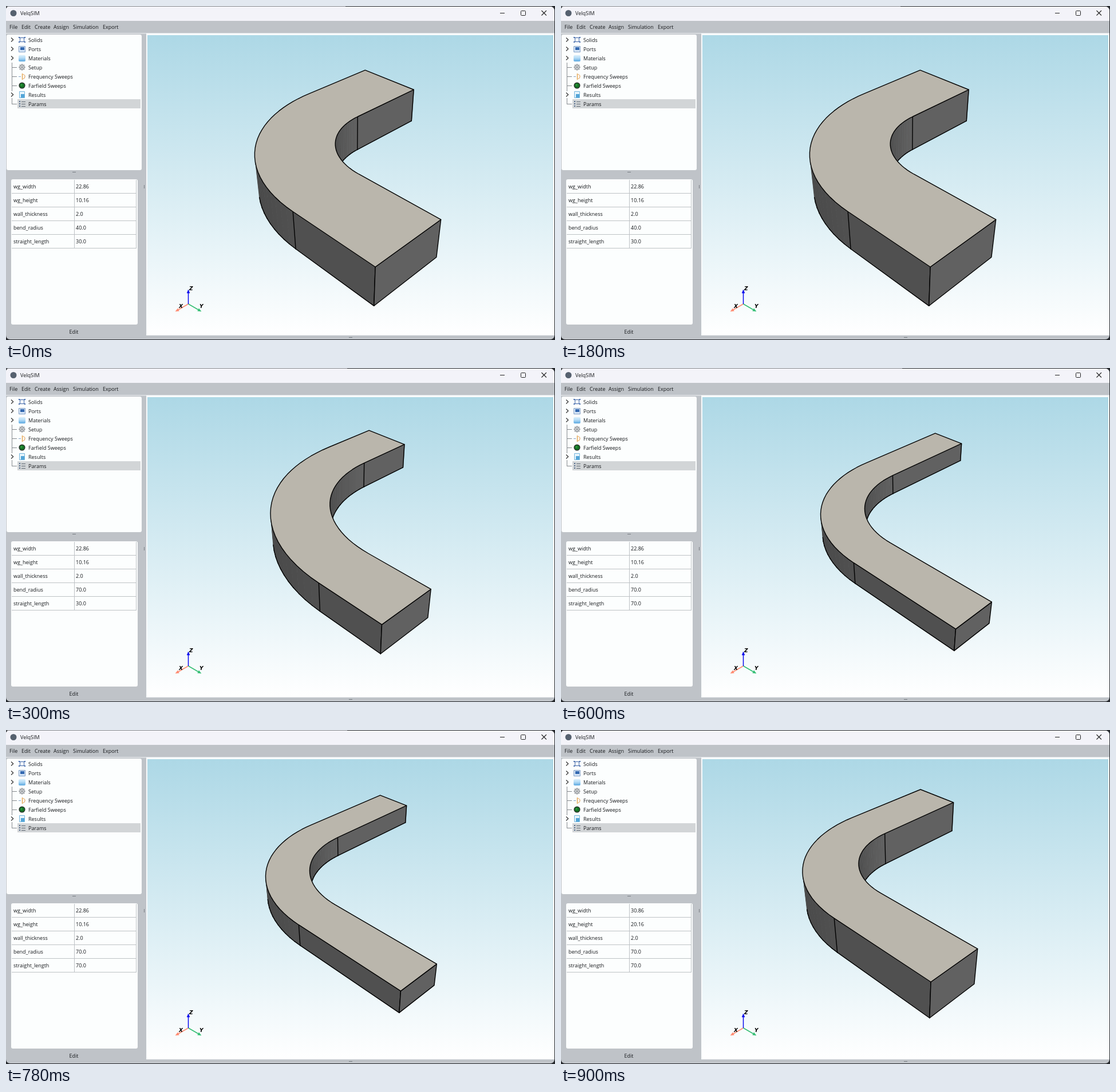
An HTML page with a canvas that plays this animation: 959 by 584 pixels, repeating every 1.2 s.

```html
<!DOCTYPE html>
<html lang="en">
<head>
<meta charset="utf-8">
<title>VelqSIM</title>
<style>
  html, body { margin: 0; width: 100%; height: 100%; overflow: hidden; background: #23262a; }
  canvas, svg { position: absolute; left: 0; top: 0; width: 959px; height: 584px; display: block; }
  text { font: 9px "Open Sans", "Noto Sans", sans-serif; fill: #17191c; white-space: pre; }
  .axis { font: italic bold 9px "DejaVu Sans", sans-serif; fill: #000; }
</style>
</head>
<body>
<canvas id="stage" width="959" height="584"></canvas>
<svg id="labels" viewBox="0 0 959 584"></svg>
<script>
const ctx = document.getElementById('stage').getContext('2d');
const labels = document.getElementById('labels');
const STEP = 300, WALL = 2, SEGS = 28;
const FOCAL = 980, CX = 602, CY = 313;

// Guide parameters, plus camera scale and the bend centre in camera units
const states = [
  { width: 22.86, height: 10.16, radius: 40, length: 30, scale: 170.3, ox: -.7685, oy: -.5911, strip: 593 },
  { width: 22.86, height: 10.16, radius: 70, length: 30, scale: 229.5, ox: -.832, oy: -.5421, strip: 596 },
  { width: 22.86, height: 10.16, radius: 70, length: 70, scale: 312.6, ox: -.7481, oy: -.6069, strip: 596 },
  { width: 30.86, height: 20.16, radius: 70, length: 70, scale: 313.5, ox: -.7485, oy: -.6456, strip: 0 }
];

function rect(x, y, w, h, fill, r = 0) {
  ctx.fillStyle = fill;
  ctx.beginPath();
  ctx.roundRect(x, y, w, h, r);
  ctx.fill();
}

function line(color, width, ...pts) {
  ctx.strokeStyle = color;
  ctx.lineWidth = width;
  ctx.beginPath();
  for (let i = 0; i < pts.length; i += 2) ctx.lineTo(pts[i], pts[i + 1]);
  ctx.stroke();
}

function poly(pts, fill, edge, width = 1.4) {
  ctx.beginPath();
  pts.forEach(p => ctx.lineTo(p[0], p[1]));
  ctx.closePath();
  ctx.fillStyle = fill;
  ctx.fill();
  ctx.strokeStyle = edge;
  ctx.lineWidth = width;
  ctx.stroke();
}

function disc(x, y, r, fill) {
  ctx.fillStyle = fill;
  ctx.beginPath();
  ctx.arc(x, y, r, 0, 7);
  ctx.fill();
}

function label(x, y, str, cls) {
  const t = document.createElementNS('http://www.w3.org/2000/svg', 'text');
  t.setAttribute('x', x);
  t.setAttribute('y', y);
  if (cls) t.setAttribute('class', cls);
  t.textContent = str;
  labels.append(t);
  return t;
}

// Isometric view with perspective; z is measured from the top face
function project(s, [x, y], z) {
  const X = s.ox + x / s.scale, Y = s.oy + y / s.scale, Z = z / s.scale;
  const depth = 1 / 3 - (X + Y + Z) / Math.sqrt(3);
  const across = (Y - X) / Math.SQRT2;
  const up = -Math.SQRT2 / 3 + (2 * Z - X - Y) / Math.sqrt(6);
  return [CX + FOCAL * across / depth, CY - FOCAL * up / depth];
}

function rail(r, len) {
  const pts = [[-len, -r]];
  for (let i = 0; i <= SEGS; i++) {
    const a = (i / SEGS - 1) * Math.PI / 2;
    pts.push([r * Math.cos(a), r * Math.sin(a)]);
  }
  pts.push([r, len]);
  return pts;
}

const gray = v => `rgb(${v},${v},${v})`;

function wall(top, low, side, shade) {
  const front = top.map((p, i) => {
    const q = top[i + 1], b = low[i];
    return !!q && side * ((q[0] - p[0]) * (b[1] - p[1]) - (q[1] - p[1]) * (b[0] - p[0])) > 0;
  });
  front.forEach((on, i) => {
    if (!on) return;
    const t = Math.min(1, Math.max(0, (i - .5) / SEGS));
    const color = gray(Math.round(shade(t)));
    poly([top[i], top[i + 1], low[i + 1], low[i]], color, color, .8);
  });
  front.forEach((on, i) => { if (on) line('#000', 1.4, ...low[i], ...low[i + 1]); });
  for (const i of [0, 1, SEGS + 1, SEGS + 2])
    if (front[i] || front[i - 1]) line('#000', 1.4, ...top[i], ...low[i]);
}

function drawGuide(s) {
  const half = s.width / 2 + WALL, len = s.length + WALL, drop = -(s.height + 2 * WALL);
  const outer = rail(s.radius + half, len), inner = rail(s.radius - half, len);
  const at = (pts, z) => pts.map(p => project(s, p, z));
  const ot = at(outer, 0), ob = at(outer, drop), it = at(inner, 0), ib = at(inner, drop);
  const end = SEGS + 2;
  ctx.lineJoin = ctx.lineCap = 'round';
  wall(it, ib, -1, t => 97 - 42 * t);
  wall(ot, ob, 1, t => 80 - 22 * (1 - t));
  poly([ot[end], it[end], ib[end], ob[end]], gray(97), '#000');
  poly([...ot, ...it.reverse()], '#bab6ac', '#000');
  ctx.lineCap = 'butt';
  ctx.lineJoin = 'miter';
}

function drawTree() {
  rect(1, 50, 236, 237, '#fcfefe', 3);
  rect(20, 163, 215, 16, '#d2d5d7');
  line('#868a8e', 1, 10.5, 99, 10.5, 149);
  line('#868a8e', 1, 10.5, 161, 10.5, 171);
  for (const y of [107.5, 123.5, 139.5, 171.5]) line('#868a8e', 1, 10, y, 19, y);
  for (const y of [59, 75, 91, 155]) line('#333', 1.2, 9, y - 3.5, 12.7, y, 9, y + 3.5);

  ctx.strokeStyle = '#3f66a8';
  ctx.lineWidth = 1;
  ctx.strokeRect(24.5, 55.5, 7, 7);
  for (const x of [22, 32]) for (const y of [54, 62]) rect(x, y, 2, 2, '#3f66a8');

  rect(22, 70, 12, 11, '#7e9cc4', 1);
  rect(23, 71, 10, 9, '#d9e8f8');
  rect(25, 72, 7, 5, '#3569b1');

  const glass = ctx.createLinearGradient(0, 86, 0, 97);
  glass.addColorStop(0, '#d9effc');
  glass.addColorStop(.45, '#b4dcf6');
  glass.addColorStop(1, '#5ba8e0');
  rect(22, 86, 12, 11, glass, 2);

  for (let i = 0; i < 8; i++) {
    const a = i * Math.PI / 4;
    disc(28 + 4.5 * Math.cos(a), 107 + 4.5 * Math.sin(a), 1.2, '#8d9195');
  }
  disc(28, 107, 4.6, '#a7abaf');
  disc(28, 107, 2.7, '#d7dadc');
  disc(28, 107, 1.2, '#777c81');

  line('#e4a044', 1.3, 28.5, 118, 28.5, 129);
  line('#87a4c9', 1, 22, 123.5, 26, 123.5);
  ctx.strokeStyle = '#df913d';
  ctx.beginPath();
  ctx.arc(29, 123.5, 4, -1.4, 1.4);
  ctx.stroke();

  disc(28, 139, 5.6, '#28352b');
  disc(28, 139, 4, '#157526');
  disc(27, 138, 1.6, '#329d40');

  rect(23, 149, 10, 12, '#72b4dc', 1);
  rect(24, 150, 8, 10, '#e8f5fc');
  rect(26, 154, 6, 6, '#53a5d8');

  for (const y of [167, 171, 175]) {
    rect(23, y - 1, 2, 2, '#4c6586');
    line('#5d6670', 1, 27, y + .5, 34, y + .5);
  }
}

function drawPanel() {
  rect(9, 303, 221, 254, '#fcfefe', 3);
  for (let i = 0; i < 5; i++) line('#bec2c5', 1, 10, 327.5 + 24 * i, 228, 327.5 + 24 * i);
  for (const x of [119.5, 227.5]) line('#bec2c5', 1, x, 304, x, 423);
  line('#777c82', 1, 116, 290.5, 122, 290.5);
  line('#777c82', 1, 241.5, 313, 241.5, 319);
  line('#777c82', 1, 599, 579.5, 605, 579.5);
}

function drawWindow(s) {
  rect(0, 0, 959, 584, '#25282c');
  rect(0, 0, s.strip, 1, '#85888c');
  rect(0, 1, 958, 582, '#bfc3c8', [5, 7, 7, 7]);
  rect(0, 1, 958, 25, '#f3f3f9', [5, 7, 0, 0]);
  disc(13, 12.5, 5.5, '#56616f');
  line('#222', 1, 863, 12.5, 871, 12.5);
  ctx.strokeStyle = '#222';
  ctx.beginPath();
  ctx.roundRect(899.5, 8.5, 8, 8, 1);
  ctx.stroke();
  line('#222', 1.1, 935.5, 8, 944, 16.5);
  line('#222', 1.1, 944, 8, 935.5, 16.5);
  rect(0, 47, 958, 1.5, '#e1e4e7');
  drawTree();
  drawPanel();

  rect(245, 48, 713, 528, '#f9fbfc');
  const sky = ctx.createLinearGradient(0, 51, 0, 575);
  sky.addColorStop(0, '#add8e6');
  sky.addColorStop(1, '#ffffff');
  rect(247, 51, 709, 524, sky);
}

function arrow(color, x, y) {
  const dx = x - 318.5, dy = y - 521, d = Math.hypot(dx, dy);
  const ux = dx / d, uy = dy / d, bx = x - ux * 6, by = y - uy * 6;
  line(color, 1.5, 318.5, 521, bx, by);
  poly([[x, y], [bx - uy * 2.5, by + ux * 2.5], [bx + uy * 2.5, by - ux * 2.5]], color, color, .4);
}

function drawAxes() {
  arrow('#ff8a70', 296, 534);
  arrow('#32bd72', 341, 534);
  arrow('#0808ee', 318.5, 496);
}

label(25, 16, 'VelqSIM');
[[6, 'File'], [27, 'Edit'], [50, 'Create'], [83, 'Assign'], [117, 'Simulation'], [169, 'Export']]
  .forEach(([x, str]) => label(x, 40, str));
['Solids', 'Ports', 'Materials', 'Setup', 'Frequency Sweeps', 'Farfield Sweeps', 'Results', 'Params']
  .forEach((str, i) => label(39, 63 + 16 * i, str));
const values = ['wg_width', 'wg_height', 'wall_thickness', 'bend_radius', 'straight_length']
  .map((str, i) => {
    label(13, 319 + 24 * i, str);
    return label(122, 319 + 24 * i, '');
  });
label(118.5, 573, 'Edit').setAttribute('text-anchor', 'middle');
label(320, 497, 'Z', 'axis');
label(302, 528, 'X', 'axis');
label(338, 528, 'Y', 'axis');

let shown = -1;
function show(i) {
  if (i === shown) return;
  shown = i;
  const s = states[i];
  drawWindow(s);
  drawGuide(s);
  drawAxes();
  [s.width.toFixed(2), s.height.toFixed(2), WALL.toFixed(1), s.radius.toFixed(1), s.length.toFixed(1)]
    .forEach((str, n) => { values[n].textContent = str; });
}

const start = performance.now();
function tick() {
  show(Math.floor((performance.now() - start) / STEP) % states.length);
  requestAnimationFrame(tick);
}
tick();
</script>
</body>
</html>
```
